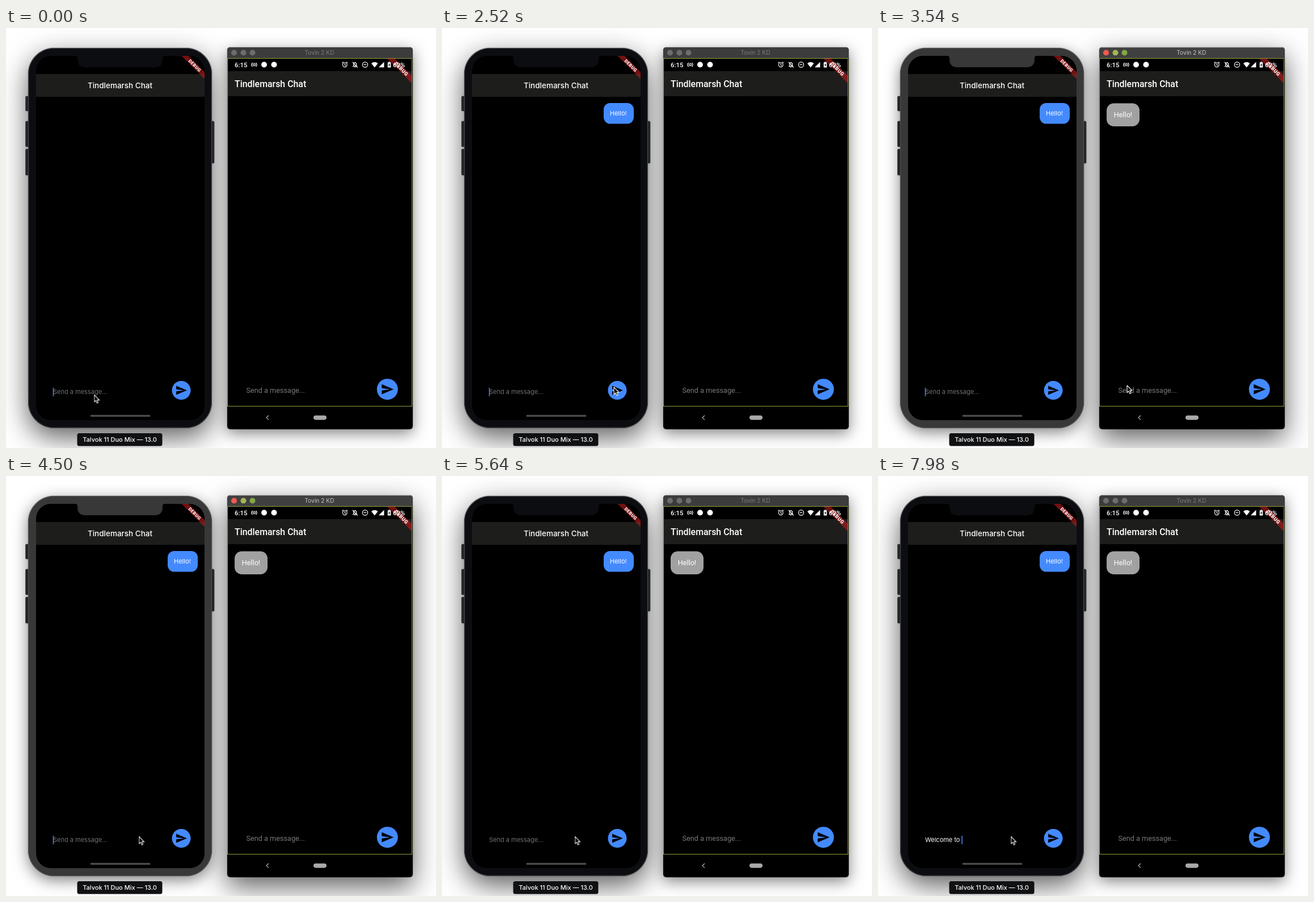
Write an HTML page that moves like this. It is 758 by 739 pixels and loops after 8 s.

```html
<!DOCTYPE html>
<html lang="en">
<head>
<meta charset="utf-8">
<title>Two phones chatting</title>
<style>
  html, body { margin: 0; width: 100%; height: 100%; overflow: hidden; background: #fff; }
  svg { position: absolute; left: 0; top: 0; display: block; }
  text { white-space: pre; }
  .inter { font-family: Inter, "Liberation Sans", sans-serif; }
  .roboto { font-family: Roboto, "Liberation Sans", sans-serif; }
  .mid { text-anchor: middle; }

  .shade { position: absolute; }
  .phone { left: 39px; top: 35px; width: 324px; height: 669px; border-radius: 46px; }
  .window { left: 390px; top: 34px; width: 327px; height: 672px; border-radius: 5px; }
  .deep { box-shadow: 0 0 2px rgba(0, 0, 0, .4), 0 16px 48px rgba(0, 0, 0, .64); }
  .soft { box-shadow: 0 0 2px rgba(0, 0, 0, .4), 0 7px 27px rgba(0, 0, 0, .5); }

  /* "left" shows while the left phone has focus, "right" while the window has it */
  .left, .right, .sent, .got { animation: 8s step-end infinite; }
  .left { animation-name: left; }
  .right { animation-name: right; }
  .sent { animation-name: sent; }
  .got { animation-name: got; }
  @keyframes left { 0%, 58.5% { opacity: 1 } 43.5% { opacity: 0 } }
  @keyframes right { 0%, 58.5% { opacity: 0 } 43.5% { opacity: 1 } }
  @keyframes sent { 0% { opacity: 0 } 27.375%, 100% { opacity: 1 } }
  @keyframes got { 0% { opacity: 0 } 34.5%, 100% { opacity: 1 } }

  #mouse { animation: mouse 8s ease-in-out infinite; }
  @keyframes mouse {
    0%, 20.25% { transform: translate(155.5px, 645.5px) }
    26%, 32.25% { transform: translate(303px, 632px) }
    38.25% { transform: translate(495px, 620px) }
    42%, 51% { transform: translate(439px, 629px) }
    55%, 100% { transform: translate(234.5px, 634.5px) }
  }
</style>
</head>
<body>
<div class="shade phone deep left"></div>
<div class="shade phone soft right"></div>
<div class="shade window soft left"></div>
<div class="shade window deep right"></div>

<svg width="758" height="739" viewBox="0 0 758 739">
  <defs>
    <path id="frame" fill-rule="evenodd" d="M85 35H317A46 46 0 0 1 363 81V658A46 46 0 0 1 317 704H85A46 46 0 0 1 39 658V81A46 46 0 0 1 85 35Z
      M79 49H122Q126 49 126 53V55Q126 69 140 69H262Q276 69 276 55V53Q276 49 280 49H324A26 26 0 0 1 350 75V664A26 26 0 0 1 324 690H79A26 26 0 0 1 53 664V75A26 26 0 0 1 79 49Z"/>
    <rect id="rim" x="39.6" y="35.6" width="322.8" height="667.8" rx="45.4" fill="none" stroke-width="1.2"/>
    <path id="bar" d="M390 53V39A5 5 0 0 1 395 34H712A5 5 0 0 1 717 39V53Z"/>
    <path id="plane" d="M2 21L23 12 2 3V10L17 12 2 14Z"/>
    <!-- corner ribbon, drawn from the top right corner -->
    <g id="ribbon">
      <path d="M-56.6 0H-39.6L0 39.6V56.6Z" fill="#b71c1c" fill-opacity=".63"/>
      <text class="roboto mid" transform="translate(-24 24) rotate(45)" y="3.9" font-size="11" font-weight="900" letter-spacing=".7" fill="#fff">DEBUG</text>
    </g>
    <g id="dots"><circle cx="402" cy="43.5" r="5"/><circle cx="418.5" cy="43.5" r="5"/><circle cx="434.5" cy="43.5" r="5"/></g>
  </defs>

  <!-- left phone -->
  <g fill="#242527" stroke="#3c3d3f" stroke-width=".8">
    <rect x="34.5" y="120" width="6" height="26" rx="1.5"/>
    <rect x="34.5" y="164" width="6" height="45" rx="1.5"/>
    <rect x="34.5" y="213" width="6" height="46" rx="1.5"/>
    <rect x="361" y="164" width="6" height="74" rx="1.5"/>
  </g>
  <rect x="45" y="41" width="312" height="656" rx="38"/>
  <rect x="53" y="81" width="297" height="40" fill="#1d1e1c"/>
  <use href="#ribbon" transform="translate(350 49) scale(.717)"/>
  <g class="left">
    <use href="#frame" fill="#0c0d10"/>
    <use href="#rim" stroke="#46484b"/>
  </g>
  <g class="right">
    <use href="#frame" fill="#383838"/>
    <use href="#rim" stroke="#4e4e4e"/>
  </g>
  <g class="inter" font-size="11" fill="#fff">
    <text class="mid" x="201" y="105.5" font-size="13.5" font-weight="500">Tindlemarsh Chat</text>
    <g class="sent">
      <rect x="285" y="132" width="53" height="36.5" rx="11.5" fill="#448aff"/>
      <text x="296" y="154">Hello!</text>
    </g>
    <text id="hint" x="83" y="644" fill="#707070">Send a message...</text>
    <text id="typed" x="83" y="644"></text>
  </g>
  <rect id="caret" y="633" width="1.5" height="15" fill="#448aff"/>
  <circle cx="309" cy="637.5" r="16.5" fill="#448aff"/>
  <use href="#plane" transform="translate(298.3 626.8) scale(.896)"/>
  <rect x="148.5" y="680.7" width="106" height="3.4" rx="1.7" fill="#4b4b4b"/>
  <rect x="125.5" y="713" width="150" height="22.5" rx="3.5" fill="#101113"/>
  <text class="inter mid" x="200.5" y="728" font-size="11" font-weight="500" fill="#fff">Talvok 11 Duo Mix — 13.0</text>

  <!-- right window -->
  <path d="M390 706V39A5 5 0 0 1 395 34H712A5 5 0 0 1 717 39V701A5 5 0 0 1 712 706H395A5 5 0 0 1 390 701Z"/>
  <g class="left">
    <use href="#bar" fill="#3c3c3c"/>
    <use href="#dots" fill="#6d6d6d"/>
    <text class="inter mid" x="552.5" y="47.3" font-size="10.2" fill="#7c7c7c">Tovin 2 KD</text>
  </g>
  <g class="right">
    <use href="#bar" fill="#404040"/>
    <path d="M394 34.5H713" stroke="#6a6a6a"/>
    <circle cx="402" cy="43.5" r="5" fill="#f0594f"/>
    <circle cx="418.5" cy="43.5" r="5" fill="#a5b552"/>
    <circle cx="434.5" cy="43.5" r="5" fill="#86a648"/>
    <text class="inter mid" x="552.5" y="47.3" font-size="10.2" fill="#c4c4c4">Tovin 2 KD</text>
  </g>
  <rect x="391" y="76" width="325" height="44" fill="#1d1e1c"/>
  <use href="#ribbon" transform="translate(716 53) scale(.793)"/>

  <!-- status bar -->
  <g class="roboto" font-size="11.5" font-weight="500" fill="#fff">
    <text x="403" y="69">6:15</text>
    <text x="682" y="69">62%</text>
  </g>
  <g fill="none" stroke="#fff" stroke-width="1.2">
    <circle cx="437.5" cy="64.5" r="1.9"/>
    <path d="M434.6 60.8Q431.4 64.5 434.6 68.2M440.4 60.8Q443.6 64.5 440.4 68.2"/>
    <circle cx="597.3" cy="64.8" r="3.8"/>
    <path d="M597.3 62.6V65L599 66.2M592.5 61.8L594.8 59.8M602.1 61.8L599.8 59.8"/>
    <path d="M611.8 67.3H618.4L617.6 66V63.4Q617.6 61 615.2 60.8 612.8 61 612.8 63.4V66ZM614.3 69.2H616.1M611 60L619.6 69.6"/>
    <circle cx="633" cy="64.5" r="4.6"/>
    <path d="M630.6 64.5H635.4"/>
  </g>
  <g fill="#fff">
    <circle cx="455" cy="64.5" r="5"/>
    <circle cx="472.5" cy="64.5" r="5"/>
    <path d="M644 62.2Q649.8 57.8 655.6 62.2L649.8 69.4Z"/>
    <path d="M657 69.3L666.5 59.8V69.3Z"/>
    <path d="M672.8 60.5H674.3V59.4H676.9V60.5H678.4V69.6H672.8Z"/>
  </g>
  <path d="M676.2 61.8L674.2 65.6H675.4V68.4L677.2 64.6H676.2Z"/>

  <g class="roboto" font-size="12.7" fill="#fff">
    <text x="403" y="103.5" font-size="15.9" font-weight="500">Tindlemarsh Chat</text>
    <g class="got">
      <rect x="403" y="132.5" width="58" height="40.5" rx="12.5" fill="#a1a1a1"/>
      <text x="415.7" y="157.3">Hello!</text>
    </g>
    <text x="423.5" y="642.3" fill="#787878">Send a message...</text>
  </g>
  <circle cx="672.3" cy="635.7" r="18.5" fill="#448aff"/>
  <use href="#plane" transform="translate(660.4 623.8) scale(.991)"/>
  <rect x="390.5" y="53.5" width="325" height="612" fill="none" stroke="#8f9f38"/>
  <path d="M463 681.8L459 685.6 463 689.4" fill="none" stroke="#b4b4b4" stroke-width="1.2"/>
  <rect x="542" y="681.8" width="23" height="7.6" rx="3.8" fill="#a9a9a9"/>

  <path id="mouse" d="M0 0V12.6L2.9 9.9 4.9 14.5 7.1 13.6 5.1 9.1H9Z" fill="#000" stroke="#fff" stroke-width="1.1" stroke-linejoin="round"/>
</svg>

<script>
  const LOOP = 8000, SEND = 2190, CLICK = 4880, FADE = 220;
  const words = [
    { text: 'Hello!', start: 480, step: 160, end: SEND },
    { text: 'Welcome to ', start: 6400, step: 145, end: LOOP }
  ];
  const el = id => document.getElementById(id);
  const hint = el('hint'), typed = el('typed'), caret = el('caret');

  // each key press or click restarts the blink with a solid caret
  const resets = [-100, SEND, CLICK];
  for (const w of words)
    [...w.text].forEach((c, i) => resets.push(w.start + i * w.step));

  function textAt(t) {
    const w = words.find(w => t >= w.start && t < w.end);
    return w ? w.text.slice(0, 1 + Math.floor((t - w.start) / w.step)) : '';
  }

  function caretAlpha(t) {
    const age = t - Math.max(...resets.filter(r => r <= t));
    const d = age % 1000;
    if (d >= 500) return Math.max(0, 1 - (d - 500) / FADE);
    return age < 500 ? 1 : Math.min(1, d / FADE);
  }

  const begin = performance.now();
  function draw() {
    const t = (performance.now() - begin) % LOOP;
    const text = textAt(t);
    if (typed.textContent !== text) typed.textContent = text;
    hint.style.opacity = text ? 0 : 1;
    caret.setAttribute('x', 82.8 + (text ? typed.getComputedTextLength() : 0));
    caret.style.opacity = caretAlpha(t);
    requestAnimationFrame(draw);
  }
  draw();
</script>
</body>
</html>
```
